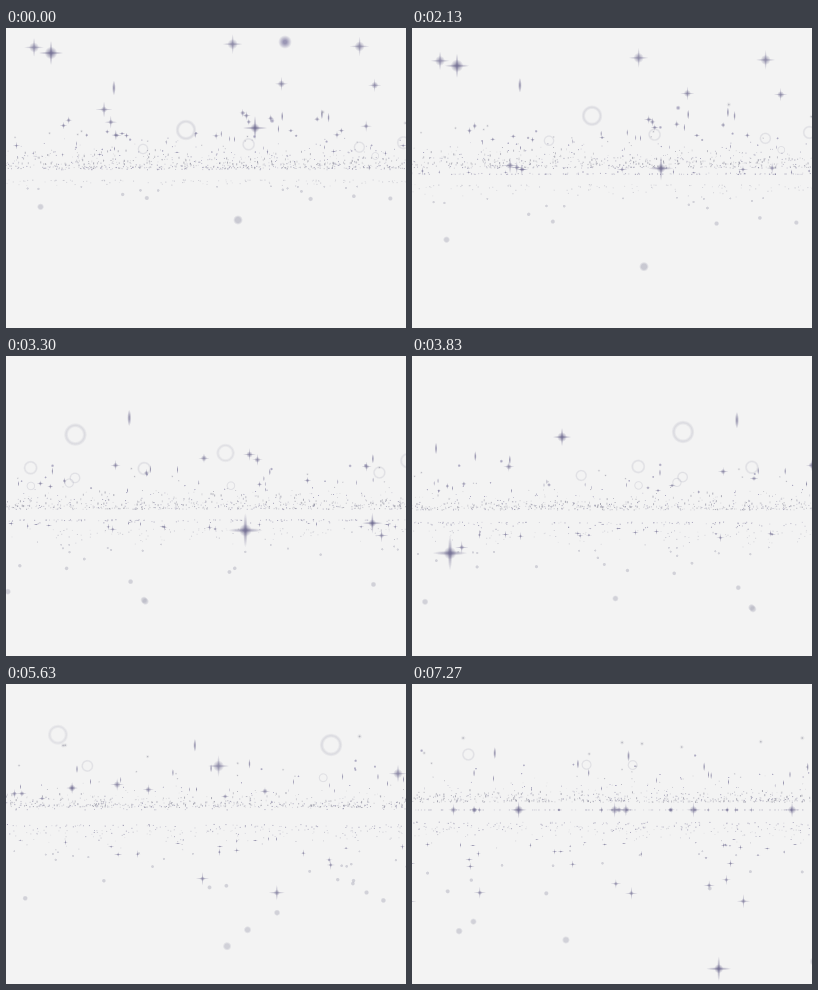
These frames come from a looping animation (400x300 px, 7.31 s). An HTML page with a canvas:

```html
<!DOCTYPE html>
<html lang="en">
<head>
<meta charset="utf-8">
<title>Drifting particle planes</title>
<style>
  html, body { margin: 0; width: 100%; height: 100%; overflow: hidden; background: #f3f3f3; }
  canvas { display: block; width: 400px; height: 300px; }
</style>
</head>
<body>
<canvas id="stage" width="400" height="300"></canvas>
<script>
const ctx = document.getElementById('stage').getContext('2d');
const W = 400, H = 300, LOOP = 7310, FPS = 30, STEP = 430;

let seed = 20117;
function rnd() {
  seed = (seed * 1664525 + 1013904223) >>> 0;
  return seed / 4294967296;
}

// Smooth curve through [time, value] keys that never overshoots them
function curve(keys, t) {
  const last = keys.length - 1;
  if (t <= keys[0][0]) return keys[0][1];
  if (t >= keys[last][0]) return keys[last][1];
  const rate = i => (keys[i + 1][1] - keys[i][1]) / (keys[i + 1][0] - keys[i][0]);
  const slope = i => {
    if (i === 0) return 0;
    if (i === last) return rate(last - 1);
    const a = rate(i - 1), b = rate(i);
    return a * b > 0 ? 2 * a * b / (a + b) : 0;
  };
  const i = keys.findIndex(k => k[0] > t) - 1;
  const [a, va] = keys[i], [b, vb] = keys[i + 1];
  const h = b - a, u = (t - a) / h, v = 1 - u;
  return v * v * (1 + 2 * u) * va + u * u * (3 - 2 * u) * vb
    + h * u * v * (v * slope(i) - u * slope(i + 1));
}

// Camera path: rests, then swings sideways while its horizon dips and rises
const STOPS = [0, 2.83, 3.83, 5.63, 6.53];
const PAN = [[2.2, 0], ...STOPS.slice(1).map((t, i) => [t, (i + 1) * STEP]), [7.27, 4 * STEP + 28]];
const HORIZON = [[2.2, 147.5], [2.83, 159.5], [3.83, 162], [5.63, 131.5], [6.53, 125], [7.27, 126]];
const squeeze = t => 1 - .128 * Math.max(0, t - 6.53);

// Sprites, drawn once on a -1..1 square
function sprite(draw) {
  const c = document.createElement('canvas');
  c.width = c.height = 64;
  const g = c.getContext('2d');
  g.translate(32, 32);
  g.scale(31, 31);
  draw(g);
  return c;
}

function glow(g, rgb, rx, ry, alpha, flat = 0) {
  const grad = g.createRadialGradient(0, 0, 0, 0, 0, 1);
  grad.addColorStop(0, `rgba(${rgb},${alpha})`);
  grad.addColorStop(flat, `rgba(${rgb},${alpha})`);
  grad.addColorStop(1, `rgba(${rgb},0)`);
  g.save();
  g.scale(rx, ry);
  g.fillStyle = grad;
  g.fillRect(-1, -1, 2, 2);
  g.restore();
}

const PURPLE = '112,108,145', GREY = '125,125,142';

const star = core => sprite(g => {
  glow(g, PURPLE, 1, .13, .7);
  glow(g, PURPLE, .13, 1, .7);
  glow(g, PURPLE, core, core, .7, .2);
});

const spindle = sprite(g => glow(g, PURPLE, .24, 1, .8, .2));
const blob = sprite(g => glow(g, '125,120,160', 1, 1, .75, .25));
const disc = sprite(g => glow(g, '175,175,190', 1, 1, .62, .55));
const fuzzy = sprite(g => {
  glow(g, GREY, 1, 1, .28);
  glow(g, GREY, .5, .5, .6);
});
const ring = sprite(g => {
  g.strokeStyle = 'rgba(165,165,172,.055)';
  for (let i = 1; i <= 6; i++) {
    g.lineWidth = i * .06;
    g.beginPath();
    g.arc(0, 0, .8, 0, 7);
    g.stroke();
  }
});

// A plane bobs as side * sin(speed * t + phase); near is its far edge,
// k the sprite size per unit of nearness, count the sprites per screen width
const plane = (img, side, speed, phase, k, near, count, rgb = GREY) =>
  ({ img, k, near, count, rgb, height: t => side * Math.sin(speed * t + phase) });

const planes = {
  upper: plane(star(.5), -1, .216, Math.PI / 2, .08, 16, 90, PURPLE),
  lower: plane(star(.36), 1, .22, -.548, .07, 14, 150, PURPLE),
  spindle: plane(spindle, -1, .13, 1.325, .085, 11, 110),
  blob: plane(blob, -1, .1, .686, .03, 9, 160, PURPLE),
  fuzzy: plane(fuzzy, -1, .12, 1.028, .036, 8, 260),
  ring: plane(ring, -1, .1, .564, .12, 15, 26, '200,200,205'),
  disc: plane(disc, 1, .14, .263, .03, 17, 130, '165,165,180')
};

const parts = [];

// A large sprite that stands at x, y while the camera passes a stop
function landmark(stop, name, x, y, size) {
  const t = STOPS[stop], p = planes[name];
  const d = (y - curve(HORIZON, t)) / p.height(t);
  parts.push({ plane: p, x: x - W / 2 - stop * STEP, d, size });
}

landmark(0, 'upper', 45, 25, 13);
landmark(0, 'lower', 249, 100, 13);
landmark(0, 'ring', 180, 102, 11);
landmark(0, 'blob', 279, 14, 7);
landmark(0, 'disc', 232, 192, 5);
landmark(1, 'lower', 10, 165, 18);
landmark(1, 'lower', 137, 162, 11);
landmark(1, 'ring', 296, 88, 11);
landmark(2, 'lower', 37, 197, 18);
landmark(2, 'upper', 149, 81, 10);
landmark(2, 'ring', 270, 76, 12);
landmark(3, 'ring', 324, 61, 12);
landmark(3, 'upper', 65, 104, 7);
landmark(4, 'lower', 290, 267, 13);
landmark(4, 'upper', 69, 111, 9);

// Everything else is spread evenly over each plane, so it thickens with distance
const SPAN = 4 * STEP + 560;
for (const p of Object.values(planes)) {
  for (let n = p.count * SPAN / W; n > 0; n--) {
    const d = p.near / Math.sqrt(.01 + .99 * rnd());
    parts.push({ plane: p, x: 280 - rnd() * SPAN, d, size: d * p.k, alpha: .15 + rnd() * .5, far: d < p.near * 2.4 });
  }
}

function draw(t) {
  const pan = curve(PAN, t), level = curve(HORIZON, t), sx = squeeze(t);
  for (const p of Object.values(planes)) p.now = p.height(t);
  ctx.globalAlpha = 1;
  ctx.fillStyle = '#f3f3f3';
  ctx.fillRect(0, 0, W, H);
  for (const { plane: p, x: px, d, size: s, alpha, far } of parts) {
    const x = W / 2 + (px + pan) * sx, y = level + p.now * d;
    if (x < -s || x > W + s || y < -s || y > H + s) continue;
    if (far) {
      const tall = p === planes.spindle ? 2 : 1;
      ctx.globalAlpha = alpha;
      ctx.fillStyle = `rgb(${p.rgb})`;
      ctx.fillRect(x - .5, y - tall / 2, 1, tall);
    } else {
      ctx.globalAlpha = alpha ? .8 : 1;
      ctx.drawImage(p.img, x - s, y - s, 2 * s, 2 * s);
    }
  }
}

const start = performance.now();
function tick() {
  const ms = (performance.now() - start) % LOOP;
  draw(Math.floor((ms + 5) * FPS / 1000) / FPS);
  requestAnimationFrame(tick);
}
tick();
</script>
</body>
</html>
```
